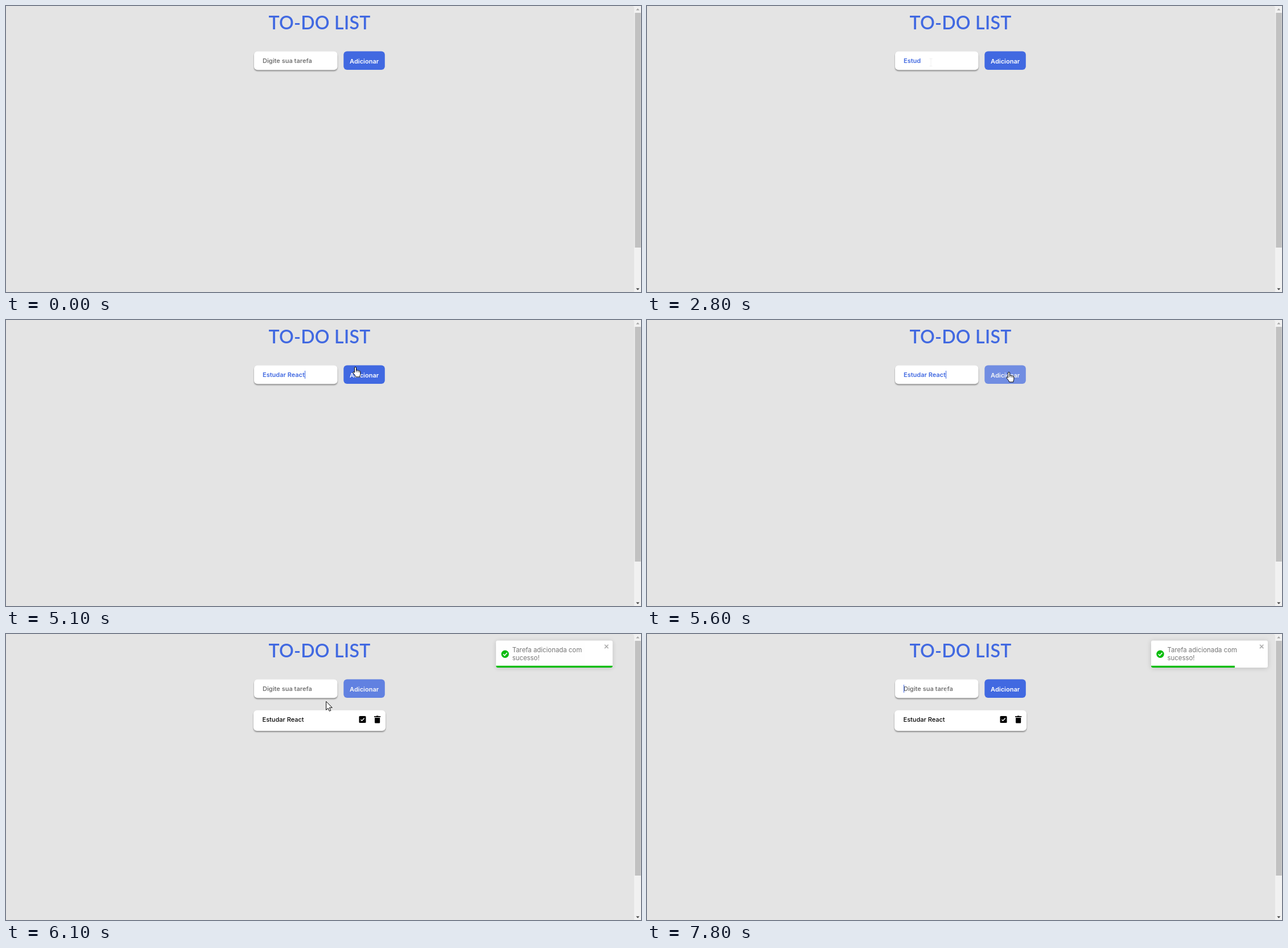
Recreate the animation shown at these times as an HTML page. Size 1116x502 px, loop 8 s.

```html
<!DOCTYPE html>
<html lang="pt">
<head>
<meta charset="utf-8">
<title>To-do list</title>
<style>
html, body { margin: 0; width: 100%; height: 100%; overflow: hidden; background: #f1f1f1; }
svg { display: block; width: 1116px; height: 502px; }
text { font: 500 11px Inter, "Open Sans", sans-serif; white-space: pre; }
.title { font: 600 32px Lato, Inter, sans-serif; letter-spacing: .3px; fill: #4169e1; text-anchor: middle; }
.hint { font-weight: 600; fill: #757575; }
.typed { font-weight: 600; fill: #4169e1; }
.label { font-weight: 600; fill: #fff; text-anchor: middle; }
.note { font-size: 11.4px; font-weight: 400; fill: #757575; }
.box { fill: #fff; filter: drop-shadow(0 2px 1.2px rgba(0,0,0,.38)); }
.toast { fill: #fff; filter: drop-shadow(0 1px 4px rgba(0,0,0,.16)); }
.mouse { fill: #fff; stroke: #000; stroke-width: 1; stroke-linejoin: round; }
</style>
</head>
<body>
<svg viewBox="0 0 1116 502">
  <defs><clipPath id="page"><path d="M0 0H1100Q1104 0 1104 4V502H0Z"/></clipPath>
  <clipPath id="round"><rect x="886" y="11.5" width="205" height="47.5" rx="3"/></clipPath></defs>

  <g clip-path="url(#page)">
    <rect width="1104" height="502" fill="#e4e4e4"/>
    <text class="title" x="551" y="41.3">TO-DO LIST</text>

    <rect class="box" x="436" y="79.8" width="146.5" height="32.5" rx="6"/>
    <text class="hint" id="hint" x="451" y="99.5">Digite sua tarefa</text>
    <text class="typed" id="typed" x="451" y="99.5"></text>
    <rect id="caret" y="89" width="1" height="14" fill="#4169e1"/>

    <g id="button">
      <rect x="593.3" y="79.6" width="72.5" height="32.5" rx="6" fill="#4169e1"/>
      <text class="label" x="629.6" y="100.5">Adicionar</text>
    </g>

    <g id="task">
      <rect class="box" x="435" y="134" width="232" height="36" rx="6"/>
      <text x="450.5" y="153.6">Estudar React</text>
      <rect x="620.5" y="144" width="12" height="12" rx="1.5"/>
      <path d="M623.5 150.2l2 2 4.2-4.4" fill="none" stroke="#fff" stroke-width="1.4"/>
      <path d="M647 144.3h3.4l.8-.9h2.8l.8.9h3.4v1.6H647ZM648 147h9.2v8.2q0 1.3-1.3 1.3h-6.6q-1.3 0-1.3-1.3Z"/>
    </g>

    <g id="toast">
      <rect class="toast" x="886" y="11.5" width="205" height="47.5" rx="3"/>
      <circle cx="902" cy="35.2" r="6.7" fill="#07bc0c"/>
      <path d="M898.7 35.3l2.5 2.5 4.3-4.8" fill="none" stroke="#fff" stroke-width="1.6"/>
      <text class="note" x="914.5" y="31.5">Tarefa adicionada com</text>
      <text class="note" x="914.5" y="46.3">sucesso!</text>
      <path d="M1077 18.7l6.4 6.4m0-6.4l-6.4 6.4" stroke="#aaa" stroke-width="1.5"/>
      <g clip-path="url(#round)"><rect id="bar" x="886" y="55.7" width="205" height="3.4" fill="#07bc0c"/></g>
    </g>

    <g id="mouse">
      <path id="arrow" class="mouse" d="M0 0V15l3.4-3.2L5.7 17l2.4-1-2.3-5.1h4.8Z"/>
      <g id="hand">
        <path class="mouse" d="M-1.5 1.5a1.5 1.5 0 0 1 3 0V6.2c.4-1 2.4-1 2.8.3.5-.8 2.2-.6 2.5.6.7-.6 2-.2 2 1.2V12c0 1.8-1 2.6-1 5.4H.6C.4 15-2.2 13-4 10.2c-.8-1.4 1-2.4 2.5-.4Z"/>
        <path d="M1.5 6v3M4.3 6.8v2.4M6.8 7.6v2" stroke="#000" stroke-width=".8"/>
      </g>
      <path id="beam" d="M-2.5-6.5H2.5M0-6.5V6.5M-2.5 6.5H2.5" fill="none" stroke="#f0f0f0"/>
    </g>
  </g>

  <rect x="1105.3" y="12" width="10.4" height="412" fill="#c1c1c1"/>
  <path d="M1107.3 7.5h6l-3-3.2Z" fill="#a3a3a3"/>
  <path d="M1107.3 495.5h6l-3 3.2Z" fill="#404040"/>
</svg>
<script>
const LOOP = 8000, STEP = 100, TASK = "Estudar React";
const $ = id => document.getElementById(id);
const show = (id, on) => $(id).setAttribute("display", on ? "inline" : "none");

// time, then number of letters in the field
const typing = [[1900, 1], [2000, 2], [2100, 3], [2300, 5], [3400, 6], [3500, 7], [3800, 8],
  [4100, 9], [4200, 10], [4300, 11], [4500, 12], [4700, 13], [5800, 0]];
const caretOn = [[1100, 1], [1600, 0], [1900, 1], [2800, 0], [3400, 1], [5800, 0], [7600, 1]];
const buttonAlpha = [[0, 1], [5200, .9], [5300, .8], [5600, .7], [5800, .8], [6900, .9], [7000, 1]];

// time, x, y, pointer shape
const route = [
  [100, 43, 1, "arrow"], [400, 250, 36, "arrow"], [700, 480, 78, "arrow"], [800, 499, 99, "beam"],
  [4900, 499, 99, "beam"], [5000, 550, 92, "beam"], [5100, 614, 82.5, "hand"], [5300, 636, 91.5, "hand"],
  [5900, 636, 91.5, "hand"], [6000, 615, 112, "arrow"], [6300, 458, 131, "arrow"],
  [6500, 580, 114, "arrow"], [6600, 622, 96, "hand"], [6800, 590, 89, "hand"],
  [6900, 560, 98, "beam"], [7000, 535, 114, "arrow"], [7200, 505, 138, "arrow"],
  [7400, 520, 104, "beam"], [7500, 526, 96, "beam"]
];

function latest(list, t, start = 0) {
  for (const [at, value] of list) if (t >= at) start = value;
  return start;
}

function pointer(t) {
  const i = route.findLastIndex(k => t >= k[0]);
  if (i < 0) return null;
  const a = route[i], b = route[i + 1] || a;
  const p = b === a ? 0 : (t - a[0]) / (b[0] - a[0]);
  return { x: a[1] + (b[1] - a[1]) * p, y: a[2] + (b[2] - a[2]) * p, kind: a[3] };
}

// cubic-bezier(.215, .61, .355, 1)
function easeOut(p) {
  const curve = (u, a, b) => 3 * u * (1 - u) ** 2 * a + 3 * u * u * (1 - u) * b + u ** 3;
  let lo = 0, hi = 1;
  for (let i = 0; i < 20; i++) {
    const mid = (lo + hi) / 2;
    if (curve(mid, .215, .355) < p) lo = mid; else hi = mid;
  }
  return curve(lo, .61, 1);
}

const bounce = [[0, 3000], [.6, -25], [.75, 10], [.9, -5], [1, 0]];
function slide(p) {
  if (p >= 1) return 0;
  const i = bounce.findLastIndex(k => p >= k[0]);
  const [p0, x0] = bounce[i], [p1, x1] = bounce[i + 1];
  return x0 + (x1 - x0) * easeOut((p - p0) / (p1 - p0));
}

function draw(t) {
  const count = latest(typing, t);
  $("typed").textContent = TASK.slice(0, count);
  show("hint", !count);
  show("caret", latest(caretOn, t));
  $("caret").setAttribute("x", Math.round(451 + (count ? $("typed").getComputedTextLength() : 0)));

  $("button").setAttribute("opacity", latest(buttonAlpha, t, 1));
  show("task", t >= 5800);

  const enter = (t - 5685) / 700;
  show("toast", enter > 0);
  if (enter > 0) {
    $("toast").setAttribute("transform", `translate(${slide(enter)} 0)`);
    $("toast").setAttribute("opacity", Math.min(1, enter / .6));
    $("bar").setAttribute("width", 205 * Math.min(1, 1 - (t - 6385) / 5000));
  }

  const m = pointer(t);
  show("mouse", m);
  if (m) {
    $("mouse").setAttribute("transform", `translate(${m.x} ${m.y})`);
    for (const kind of ["arrow", "hand", "beam"]) show(kind, kind === m.kind);
  }
}

function tick() {
  const t = performance.now() % LOOP;
  draw(Math.floor(t / STEP) * STEP);
  requestAnimationFrame(tick);
}
tick();
</script>
</body>
</html>
```
